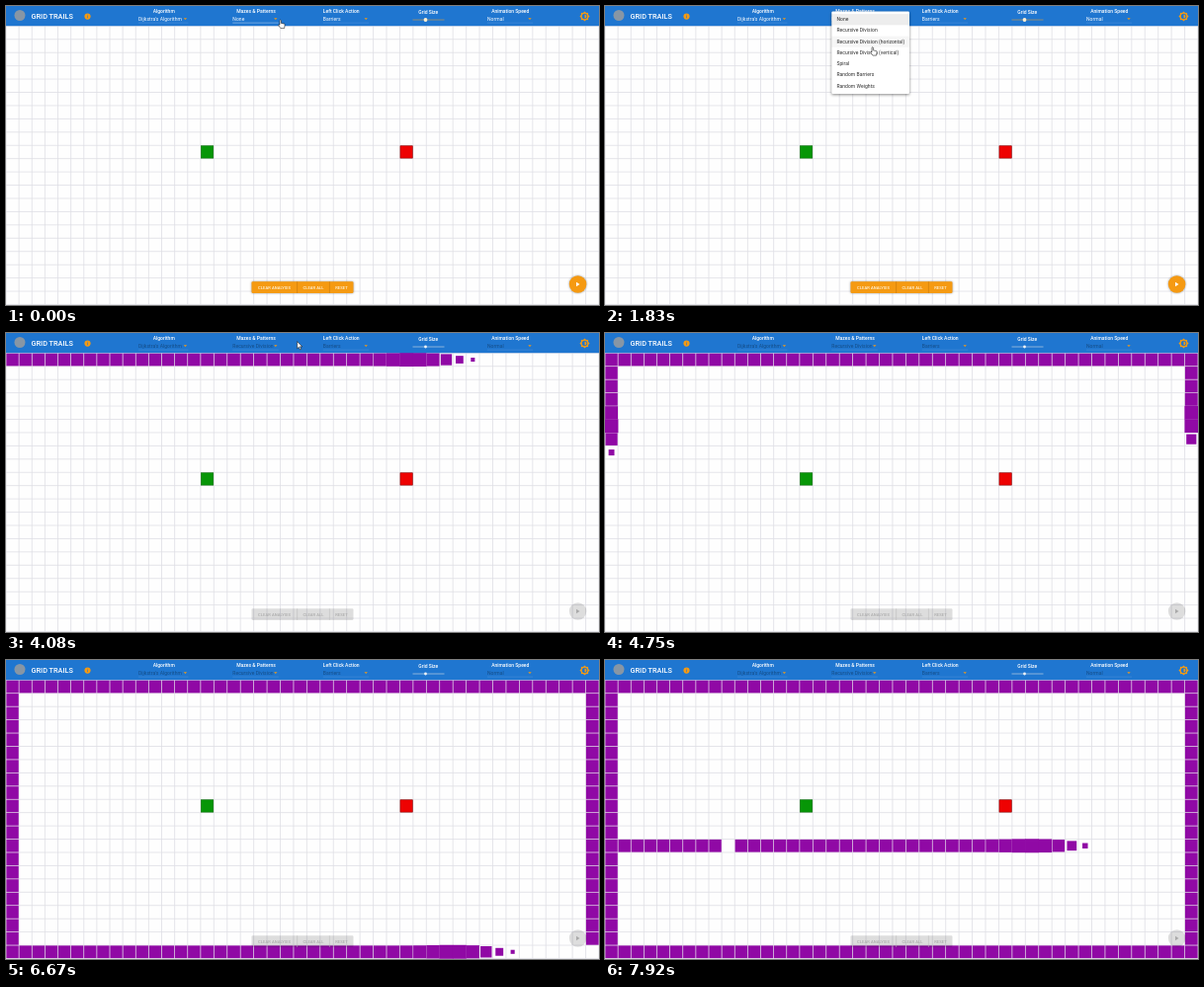
An HTML page for the animation above (8000 ms loop, 600 by 303 pixels).

```html
<!DOCTYPE html>
<html lang="en">
<head>
<meta charset="utf-8">
<title>Maze generator</title>
<style>
  html, body { margin: 0; width: 100%; height: 100%; overflow: hidden; background: #fefefe; }
  svg { display: block; width: 100%; height: 100%; }
  text { font: 5px Roboto, sans-serif; fill: #fff; letter-spacing: .01em; }
  .title { font-size: 7.3px; font-weight: 500; letter-spacing: 0; }
  .label { font-weight: 500; text-anchor: middle; letter-spacing: 0; }
  .button { font-size: 4.06px; font-weight: 500; text-anchor: middle; letter-spacing: .02em; }
  #menu text { fill: #2b2b2b; }
  .accent { fill: #f59a12; }
  .shadow { filter: drop-shadow(0 .7px .8px #0006); }
</style>
</head>
<body>
<svg viewBox="0 0 600 303" preserveAspectRatio="none">
  <path id="grid" fill="none" stroke="#dfdfe5" stroke-width=".8"/>
  <g id="walls" fill="#9009a5"></g>
  <g id="ends" stroke-width=".6"></g>

  <rect width="600" height="20.2" fill="#1f76d0"/>
  <circle cx="14" cy="9.5" r="5.5" fill="#8796a5"/>
  <text class="title" x="25.6" y="13">GRID TRAILS</text>
  <circle class="accent" cx="82.5" cy="10.6" r="3.1"/>
  <path d="M82.5 10.2v2M82.5 8.8v.7" stroke="#1f76d0" stroke-width=".65"/>
  <g id="selects"></g>
  <text class="label" x="427.3" y="7.5">Grid Size</text>
  <path id="rail" d="M411.5 14H443.5" stroke-width=".7"/>
  <circle id="thumb" cx="424.5" cy="14" r="1.9"/>
  <g transform="translate(585.5 10.5)">
    <rect class="accent" x="-3.6" y="-3.6" width="7.2" height="7.2"/>
    <rect class="accent" x="-3.6" y="-3.6" width="7.2" height="7.2" transform="rotate(45)"/>
    <circle r="2.7" fill="#1f76d0"/>
    <path class="accent" d="M0-1.9a1.9 1.9 0 0 1 0 3.8z"/>
  </g>

  <g id="disabled">
    <rect x="248.5" y="279.3" width="103" height="11.7" rx="1.2" fill="#000" fill-opacity=".13"/>
    <circle cx="578.6" cy="282" r="8.75" fill="#000" fill-opacity=".13"/>
    <path d="M577 279.8v4.4l3.5-2.2z" fill="#a9a9a9"/>
  </g>
  <g id="enabled">
    <rect class="accent shadow" x="248.5" y="279.3" width="103" height="11.7" rx="1.2"/>
    <circle class="accent shadow" cx="578.6" cy="282" r="8.75"/>
    <path d="M577 279.8v4.4l3.5-2.2z" fill="#fff"/>
  </g>
  <path id="dividers" d="M294.6 279.3v11.7M327.4 279.3v11.7" stroke-width=".5"/>
  <g id="captions">
    <text class="button" x="271.5" y="286.6">CLEAR ANALYSIS</text>
    <text class="button" x="311" y="286.6">CLEAR ALL</text>
    <text class="button" x="339.5" y="286.6">RESET</text>
  </g>

  <g id="menu">
    <rect x="229.3" y="5.6" width="78.7" height="83.4" rx="1.2" fill="#fff"
      style="filter: drop-shadow(0 1.2px 1.8px #0007)"/>
    <rect x="229.3" y="8.1" width="78.7" height="11.25" fill="#000" fill-opacity=".07"/>
    <rect id="hover" x="229.3" width="78.7" height="11.25" fill="#000" fill-opacity=".035"/>
  </g>
  <g id="cursor" stroke="#111" stroke-width=".55" stroke-linejoin="round" fill="#fff">
    <path id="arrow" d="M0 0v7.2l1.7-1.5 1.1 2.5 1.2-.5-1.1-2.5h2.3z"/>
    <path id="hand" d="M0 .6Q.7-.4 1.4.6V3.4L4.4 4Q5.2 4.2 5.1 5L4.6 8.6H.9L-1.5 5.4Q-1.2 4.4 0 5.2Z"/>
  </g>
</svg>
<script>
const LOOP = 8000, COLS = 45, ROWS = 21, TOP = 20.3, PITCH = 13.4375;
const OPEN = 1000, CLOSE = 2380, DISABLE = 3100;
const $ = id => document.getElementById(id);

function add(parent, tag, attrs, text = '') {
  const node = document.createElementNS('http://www.w3.org/2000/svg', tag);
  for (const key in attrs) node.setAttribute(key, attrs[key]);
  node.textContent = text;
  return parent.appendChild(node);
}

// The first 15 columns are one device pixel narrower than the rest.
const colX = c => c * 13.125 + Math.max(0, c - 15) * (PITCH - 13.125);
const rowY = r => TOP + r * PITCH;
const clamp = v => Math.min(1, Math.max(0, v));
const mix = (a, b, k) => a + (b - a) * k;
const mixColor = (a, b, k) => `rgba(${a.map((v, i) => mix(v, b[i], k)).join()})`;

// cubic-bezier(.25, .1, .25, 1)
function ease(x) {
  if (x <= 0 || x >= 1) return clamp(x);
  let lo = 0, hi = 1, s;
  for (let i = 0; i < 18; i++) {
    s = (lo + hi) / 2;
    if (.75 * s * (1 - s) + s ** 3 < x) lo = s; else hi = s;
  }
  return .3 * s * (1 - s) ** 2 + 3 * s * s * (1 - s) + s ** 3;
}

let lines = '';
for (let c = 0; c <= COLS; c++) lines += `M${colX(c)} ${TOP}V${rowY(ROWS)}`;
for (let r = 0; r <= ROWS; r++) lines += `M0 ${rowY(r)}H600`;
$('grid').setAttribute('d', lines);

for (const [col, fill, stroke] of [[15, '#079607', '#056a05'], [30, '#ee0202', '#8a0000']])
  add($('ends'), 'rect', { x: colX(col) + .5, y: rowY(9) + .5, width: 12.4, height: 12.4, fill, stroke });

const walls = [];
function addWall(col, row, birth) {
  const width = colX(col + 1) - colX(col);
  const node = add($('walls'), 'rect', {
    x: -width / 2 + .35, y: -PITCH / 2 + .35, width: width - .7, height: PITCH - .7
  });
  walls.push({ node, birth, x: colX(col) + width / 2, y: rowY(row) + PITCH / 2 });
}
for (let c = 0; c < COLS; c++) addWall(c, 0, 3024 + 30 * c);
for (let i = 0; i < 2 * (ROWS - 2); i++)
  addWall(i % 2 ? COLS - 1 : 0, 1 + (i >> 1), 4369 + 29.7 * i);
for (let c = 0; c < COLS; c++) addWall(c, ROWS - 1, 5497 + 30.7 * c);
for (let c = 1, i = 0; c < COLS - 1; c++)
  if (c !== 9) addWall(c, 12, 6879 + 30 * i++);

const values = [
  ['Algorithm', 159.7, "Dijkstra's Algorithm", 134, 181.4],
  ['Mazes & Patterns', 253, 'None', 229.3, 272.8],
  ['Left Click Action', 339.2, 'Barriers', 320.8, 364.2],
  ['Animation Speed', 510.3, 'Normal', 487, 530]
].map(([label, center, value, x, arrow]) => {
  const box = $('selects');
  add(box, 'text', { class: 'label', x: center, y: 7.1 }, label);
  add(box, 'path', { class: 'accent', d: `M${arrow - 1.7} 12.2h3.4l-1.7 1.8z` });
  const underline = add(box, 'path', {
    d: `M${x} 17.1H${arrow + 3}`, stroke: '#fff', 'stroke-width': .4, opacity: .25
  });
  return { text: add(box, 'text', { x, y: 14.7 }, value), underline };
});
const maze = values[1];

['None', 'Recursive Division', 'Recursive Division (horizontal)', 'Recursive Division (vertical)',
  'Spiral', 'Random Barriers', 'Random Weights'].forEach((name, i) =>
  add($('menu'), 'text', { x: 234.4, y: 15.2 + 11.25 * i }, name));

const path = [
  [0, 277, 14], [450, 277, 14], [900, 268, 13], [1200, 268, 13], [1830, 270, 41.5],
  [2200, 262, 25], [2450, 262, 25], [2900, 294.6, 8.6], [4350, 294.6, 8.6], [4850, 300, -12], [LOOP, 300, -12]
];
function cursorAt(t) {
  const i = path.findIndex(p => p[0] > t);
  const [t0, x0, y0] = path[i - 1], [t1, x1, y1] = path[i];
  const k = (t - t0) / (t1 - t0), s = k * k * (3 - 2 * k);
  return [mix(x0, x1, s), mix(y0, y1, s)];
}

function draw(t) {
  for (const { node, birth, x, y } of walls) {
    const age = t - birth;
    const scale = age < 150 ? mix(.3, 1.1, ease(age / 150)) : mix(1.1, 1, ease((age - 150) / 150));
    node.setAttribute('visibility', age < 0 ? 'hidden' : 'visible');
    node.setAttribute('transform', `translate(${x} ${y}) scale(${scale})`);
  }

  const [x, y] = cursorAt(t);
  const pointing = t < 2600;
  $('cursor').setAttribute('transform', `translate(${x} ${y})`);
  $('hand').style.display = pointing ? '' : 'none';
  $('arrow').style.display = pointing ? 'none' : '';

  const shown = ease((t - OPEN) / 220) * (1 - ease((t - CLOSE) / 200));
  const grow = t < CLOSE ? mix(.75, 1, shown) : 1;
  $('menu').setAttribute('opacity', shown);
  $('menu').setAttribute('transform', `translate(268 13) scale(${grow} ${grow * grow}) translate(-268 -13)`);
  $('hover').setAttribute('y', 8.1 + 11.25 * Math.max(0, Math.floor((y - 8.1) / 11.25)));

  const off = clamp((t - DISABLE) / 300);
  for (const { text } of values) text.style.fill = mixColor([255, 255, 255, 1], [0, 0, 0, .36], off);
  maze.text.textContent = t < CLOSE ? 'None' : 'Recursive Division';
  maze.underline.setAttribute('opacity', t < 2600 ? .9 : .25);
  $('rail').setAttribute('stroke', mixColor([235, 160, 50, .8], [205, 215, 225, .9], off));
  $('thumb').setAttribute('fill', mixColor([255, 240, 210, 1], [240, 244, 248, 1], off));
  $('thumb').setAttribute('r', mix(1.9, 1.4, off));
  $('enabled').setAttribute('opacity', 1 - off);
  $('disabled').setAttribute('opacity', off);
  $('dividers').setAttribute('stroke', mixColor([190, 115, 10, 1], [185, 185, 185, 1], off));
  for (const text of $('captions').children)
    text.style.fill = mixColor([255, 244, 222, 1], [172, 172, 172, 1], off);
}

let start;
function tick(now) {
  start ??= now;
  draw((now - start) % LOOP);
  requestAnimationFrame(tick);
}
draw(0);
requestAnimationFrame(tick);
</script>
</body>
</html>
```
